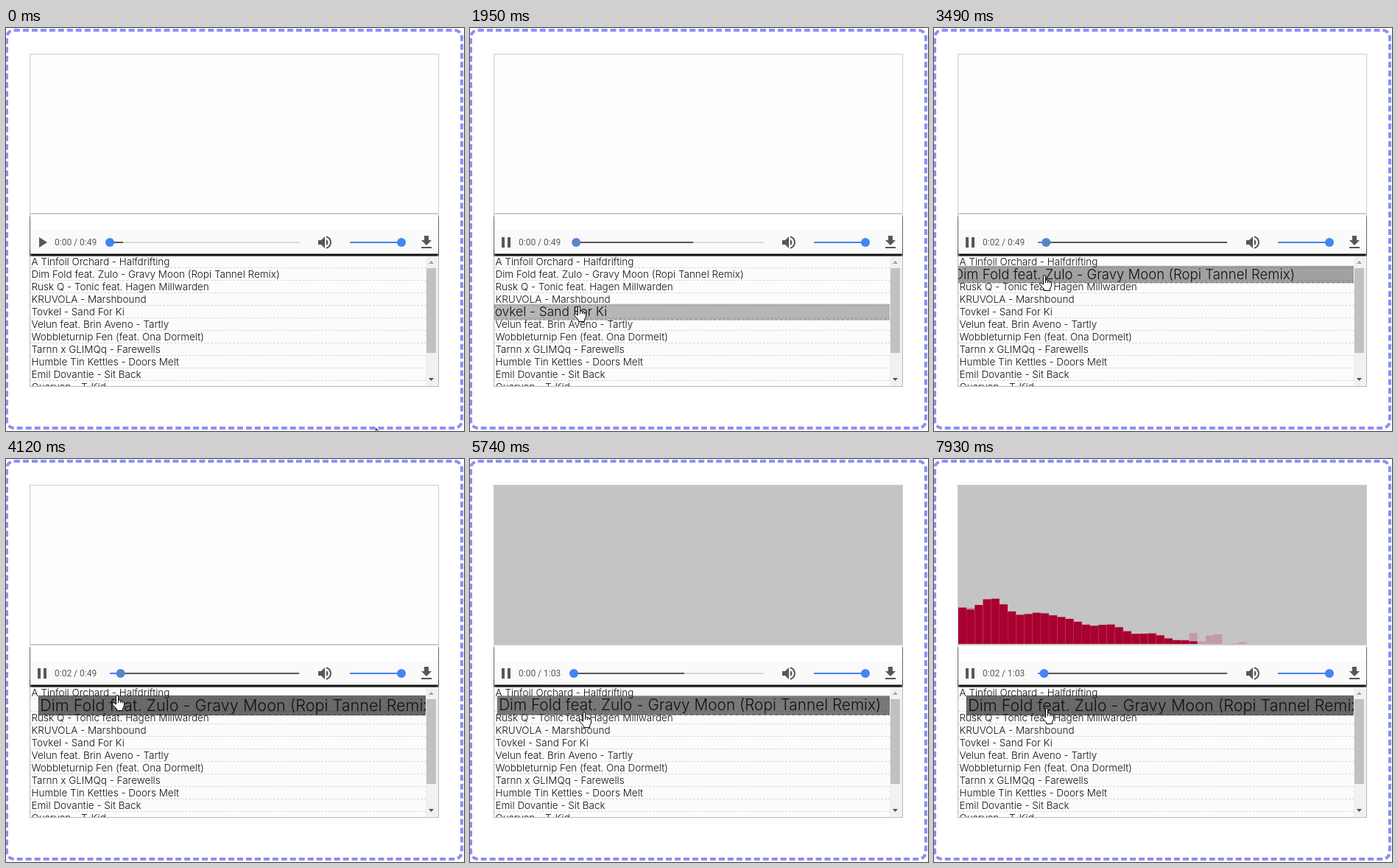
Recreate the animation shown at these times as an HTML page with a canvas. Size 622 by 547 pixels, loop 8 s.

```html
<!DOCTYPE html>
<html lang="en">
<head>
<meta charset="utf-8">
<title>Playlist</title>
<style>
  html, body { margin: 0; width: 100%; height: 100%; overflow: hidden; background: #fff; }
  #edge {
    position: absolute; left: -1px; top: 1px; width: 622px; height: 544px;
    box-sizing: border-box; border: 4px dashed #8e8ef8; border-radius: 12px;
  }
  canvas { position: absolute; left: 0; top: 0; }
</style>
</head>
<body>
<div id="edge"></div>
<canvas id="stage" width="622" height="547"></canvas>
<script>
const ctx = document.getElementById('stage').getContext('2d');
const LOOP = 8000, STEP = 10, GROW = 500;
const ROW = 17, LEFT = 33, RIGHT = 570, TOP = 309, BOTTOM = 486, WIDTH = RIGHT - LEFT;
const BLUE = '#4285f4', ICON = '#575757';
const PLAY = 1350, CLICK = 4850, READY = 5270, REPLAY = 5830;

const songs = [
  'A Tinfoil Orchard - Halfdrifting',
  'Dim Fold feat. Zulo - Gravy Moon (Ropi Tannel Remix)',
  'Rusk Q - Tonic feat. Hagen Millwarden',
  'KRUVOLA - Marshbound',
  'Tovkel - Sand For Ki',
  'Velun feat. Brin Aveno - Tartly',
  'Wobbleturnip Fen (feat. Ona Dormelt)',
  'Tarnn x GLIMQq - Farewells',
  'Humble Tin Kettles - Doors Melt',
  'Emil Dovantie - Sit Back',
  'Quarven - T-Kid'
];

// pointer moves: start, end, x, y
const moves = [
  [0, 0, 502, 543], [70, 480, 54, 275], [600, 950, 57, 287], [1200, 1640, 130, 399],
  [1710, 1950, 148, 378], [2110, 2660, 150, 322], [2860, 2960, 150, 330],
  [3300, 3380, 150, 339], [3380, 4040, 151, 321], [4150, 4850, 156, 319],
  [5270, 5600, 155, 344], [6100, 6600, 155, 348], [6900, 7930, 153, 339]
];

const icons = {
  play: new Path2D('M8 5v14l11-7z'),
  pause: new Path2D('M6 19h4V5H6v14zm8-14v14h4V5h-4z'),
  save: new Path2D('M19 9h-4V3H9v6H5l7 7 7-7zM5 18v2h14v-2z'),
  sound: new Path2D('M3 9v6h4l5 5V4L7 9H3zm13.5 3c0-1.77-1.02-3.29-2.5-4.03v8.05c1.48-.73 2.5-2.25 2.5-4.02z' +
    'M14 3.23v2.06c2.89.86 5 3.54 5 6.71s-2.11 5.85-5 6.71v2.06c4.01-.91 7-4.49 7-8.77s-2.99-7.86-7-8.77z'),
  up: new Path2D('M0 4L3.5 0L7 4Z'),
  down: new Path2D('M0 0H7L3.5 4Z')
};
const arrow = new Path2D('M.5 .5V16.5L4 13L6.4 18.5L8.6 17.6L6.3 12.2H11.5Z');
const hand = new Path2D('M5.5 13V2Q5.5 .5 7 .5Q8.5 .5 8.5 2V7.2Q11.5 6 11.5 8.4Q14 7.3 14 9.4' +
  'Q16.5 8.7 16.5 11V15L14.5 19V21.5H6.5V19.5L1 13.5Q0 11.5 1.5 10.8Q3 10.5 5.5 13Z');
const knuckles = new Path2D('M8.5 7.2V11M11.5 8.4V11M14 9.4V11.5');

const clamp = v => Math.max(0, Math.min(1, v));
const mix = (a, b, u) => a + (b - a) * u;
const span = (t, a, b) => clamp((t - a) / (b - a || 1));
const rand = (i, k) => {
  const v = Math.sin(i * 12.9898 + k * 78.233) * 43758.5453;
  return v - Math.floor(v);
};

// cubic-bezier(.25, .1, .25, 1)
function ease(x) {
  if (x <= 0 || x >= 1) return clamp(x);
  let lo = 0, hi = 1, s = 0.5;
  for (let i = 0; i < 18; i++) {
    s = (lo + hi) / 2;
    const q = 1 - s;
    if (0.75 * q * s + s ** 3 < x) lo = s; else hi = s;
  }
  const q = 1 - s;
  return 0.3 * q * q * s + 3 * q * s * s + s ** 3;
}

function pointerAt(t) {
  let x = 0, y = 0;
  for (const [from, to, tx, ty] of moves) {
    if (t < from) break;
    const u = to > from ? span(t, from, to) : 1;
    x = mix(x, tx, u);
    y = mix(y, ty, u);
  }
  return { x, y };
}

const overList = y => y >= TOP && y < BOTTOM;
const growth = (hover, t) => ease((t - hover.since) / GROW);

// The grown row keeps the pointer until it leaves the grown box.
function hoverTimeline() {
  const states = [];
  let hover = { row: -1, since: 0 };
  for (let t = 0; t <= LOOP; t += STEP) {
    const { y } = pointerAt(t);
    const center = TOP + (hover.row + 0.5) * ROW;
    const reach = ROW / 2 * (1 + 0.6 * growth(hover, t));
    const kept = hover.row >= 0 && overList(y) && Math.abs(y - center) <= reach;
    const row = overList(y) ? Math.floor((y - TOP) / ROW) : -1;
    if (!kept && row !== hover.row) hover = { row, since: t };
    states.push(hover);
  }
  return states;
}
const hovers = hoverTimeline();

function rect(x, y, w, h, color) {
  ctx.fillStyle = color;
  ctx.fillRect(x, y, w, h);
}

function dot(x, r, color) {
  ctx.fillStyle = color;
  ctx.beginPath();
  ctx.arc(x, 291, r, 0, 7);
  ctx.fill();
}

function shape(p, x, y, fill, stroke) {
  ctx.save();
  ctx.translate(x, y);
  ctx.fillStyle = fill;
  ctx.fill(p);
  if (stroke) {
    ctx.strokeStyle = stroke;
    ctx.stroke(p);
  }
  ctx.restore();
}

// A falling spectrum with a damped ripple; it grows taller and wider.
const progress = t => (t - 6600) / 1330;
const reachAt = t => mix(20, 29, progress(t));
function level(i, t) {
  const u = progress(t);
  const slope = mix(50, 60, u) * (1 - i / reachAt(t));
  const ripple = 12 * Math.exp(-i / 9) * Math.sin(2 * Math.PI * (i - mix(0.7, 2.2, u)) / mix(9.5, 7, u));
  const wobble = 2 * Math.sin(t / 110 + i * 1.3);
  return slope > 0 ? Math.max(0, slope + ripple + wobble) * span(t, REPLAY, 6100) : 0;
}

function visual(t) {
  rect(32, 35, 556, 218, '#cbcbcb');
  const shade = t < CLICK + 40 ? 254 : t < 5040 ? 240 : 196;
  rect(33, 36, 554, 215, `rgb(${shade},${shade},${shade})`);
  if (t < REPLAY) return;

  const bar = (i, h, color) => rect(33 + i * 11.2, 251 - h, 11, h, color);
  const red = Math.round(mix(144, 168, progress(t)));
  const end = Math.floor(reachAt(t)), beat = Math.floor(t / 400);
  for (let i = 0; i < end + 7; i++) {
    const now = level(i, t);
    bar(i, Math.max(now, level(i, t - 150)), 'rgba(190,30,80,.35)');
    if (i > end - 4 && rand(i, beat) > 0.45) bar(i, now + 14 * rand(i + 9, beat), 'rgba(190,30,80,.25)');
    bar(i, now, `rgb(${red},0,47)`);
  }
}

function panel() {
  ctx.save();
  ctx.beginPath();
  ctx.rect(32, 253, 556, 57);
  ctx.clip();
  ctx.shadowColor = '#000';
  ctx.shadowBlur = 3;
  ctx.shadowOffsetY = 2;
  for (let i = 0; i < 2; i++) rect(33, 253, 554, 53.5, '#fff');
  ctx.restore();
  rect(33, 275, 554, 31, '#fafafa');
}

function controls(t) {
  panel();
  shape(t < 1000 ? icons.play : icons.pause, 37, 279, ICON);
  shape(icons.save, 559, 279, ICON);

  const loading = t >= CLICK && t < READY, second = t >= READY;
  const length = second ? 63 : 49;
  const secs = Math.max(0, t - (second ? REPLAY : PLAY)) / 1000;
  const clock = s => Math.floor(s / 60) + ':' + String(Math.floor(s % 60)).padStart(2, '0');
  ctx.font = '12px Roboto, Arial, sans-serif';
  ctx.fillStyle = '#5a5a5a';
  ctx.fillText(loading ? '0:00' : clock(secs) + ' / ' + clock(length), 66, 295);

  if (loading) {
    rect(107, 290, 430, 2, '#d9d9d9');
    dot(107, 6, BLUE);
    return;
  }
  let loaded = 398;
  if (second) loaded = t < 7000 ? 291 : 398;
  else if (t < 2110) loaded = t < PLAY ? 159 : 303;
  const x = 141 + 258 * secs / length;
  rect(141, 290, 258, 2, '#d9d9d9');
  rect(141, 290, loaded - 141, 2, ICON);
  rect(141, 290, x - 141, 2, BLUE);
  dot(x, 6, BLUE);
  if (secs > 0 && !second) dot(x, 4.5, 'rgba(120,130,145,.6)');

  shape(icons.sound, 421, 279, ICON);
  rect(467, 290, 70, 2, BLUE);
  dot(537, 6, BLUE);
}

function dashes(y, color) {
  ctx.strokeStyle = color;
  ctx.setLineDash([3, 2]);
  ctx.beginPath();
  ctx.moveTo(LEFT, y);
  ctx.lineTo(RIGHT, y);
  ctx.stroke();
  ctx.setLineDash([]);
}

function label(i, y) {
  ctx.font = '300 13.5px Inter, "Open Sans", sans-serif';
  ctx.fillStyle = '#111';
  ctx.fillText(songs[i], 34.5, y + 13);
}

function grownRow(i, p) {
  const y = TOP + i * ROW, cx = LEFT + WIDTH / 2, cy = y + ROW / 2;
  const scale = 1 + 0.6 * p, line = mix(214, 80, p);
  ctx.save();
  ctx.beginPath();
  ctx.rect(LEFT, TOP, WIDTH, BOTTOM - TOP);
  ctx.clip();
  ctx.translate(cx, cy);
  ctx.scale(scale, scale);
  ctx.translate(0.2 * p * WIDTH - cx, -cy);
  rect(LEFT, y, WIDTH, ROW, `rgba(0,0,0,${0.58 * p})`);
  dashes(y + 16.5, `rgb(${line},${line},${line})`);
  label(i, y);
  ctx.restore();
}

function list(t) {
  const hover = hovers[Math.floor(t / STEP)];
  ctx.lineWidth = 1;
  ctx.strokeStyle = '#b9b9b9';
  ctx.strokeRect(32.5, 300.5, 555, 186);
  controls(t);

  ctx.save();
  ctx.beginPath();
  ctx.rect(33, 309.5, 554, 176.5);
  ctx.clip();
  rect(33, 310, 554, 176, '#fcfcfc');
  songs.forEach((s, i) => {
    const y = TOP + i * ROW;
    dashes(y + 16.5, '#d6d6d6');
    if (i !== hover.row) label(i, y);
  });
  if (hover.row >= 0) grownRow(hover.row, growth(hover, t));
  rect(RIGHT, 310, 17, 176, '#f1f1f1');
  rect(571, 326, 13, 115, '#c1c1c1');
  shape(icons.up, 574, 316, '#a3a3a3');
  shape(icons.down, 574, 475, '#505050');
  ctx.restore();
}

function pointer(t) {
  const at = pointerAt(t), x = Math.round(at.x), y = Math.round(at.y);
  if (overList(at.y)) {
    shape(hand, x - 7, y - 1, '#fff', '#000');
    shape(knuckles, x - 7, y - 1, 'transparent', '#000');
  } else {
    shape(arrow, x, y, '#fff', '#000');
  }
}

function draw(t) {
  ctx.clearRect(0, 0, 622, 547);
  visual(t);
  list(t);
  pointer(t);
}

const start = performance.now();
function tick() {
  draw((performance.now() - start) % LOOP);
  requestAnimationFrame(tick);
}
tick();
</script>
</body>
</html>
```
